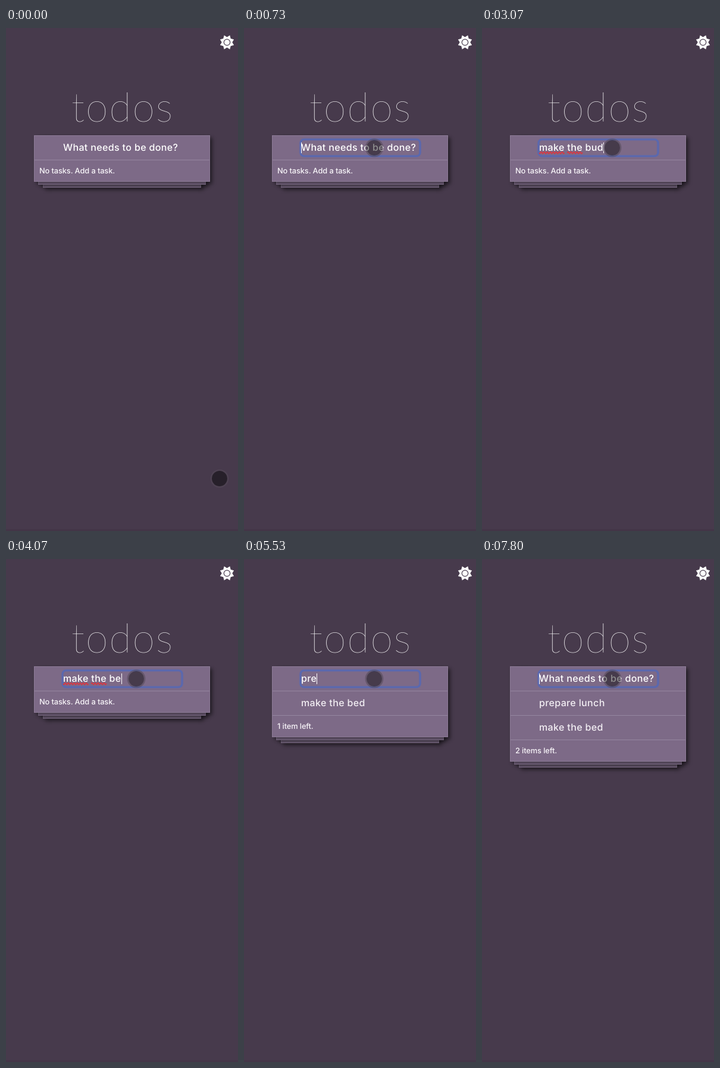
An HTML page with a canvas for the animation above (8 s loop, 390x844 px).

```html
<!DOCTYPE html>
<html lang="en">
<head>
<meta charset="utf-8">
<title>todos</title>
<style>
html, body { margin: 0; width: 100%; height: 100%; overflow: hidden; background: #473a4c; }
canvas { display: block; }
</style>
</head>
<body>
<canvas id="stage" width="390" height="844"></canvas>
<script>
const ctx = document.getElementById('stage').getContext('2d');
const LOOP = 8000;
const BODY_FONT = 'Inter, "Noto Sans", sans-serif';
const TITLE_FONT = 'Lato, Inter, sans-serif';
const PLACEHOLDER = 'What needs to be done?';
const BG = '#473a4c', CARD = '#7d6a87', LINE = '#9586a0';

// Each entry is [time, value]; a value holds until the next entry.
const typing = [
  [0, ''], [1870, 'm'], [1930, 'ma'], [2070, 'mak'], [2130, 'make'], [2270, 'make '],
  [2400, 'make t'], [2470, 'make th'], [2600, 'make the'], [2670, 'make the '],
  [2800, 'make the b'], [2930, 'make the bu'], [3070, 'make the bud'],
  [3530, 'make the bu'], [3930, 'make the b'], [4070, 'make the be'],
  [4270, 'make the bed'], [4330, ''],
  [5330, 'p'], [5470, 'pr'], [5530, 'pre'], [5600, 'prep'], [5730, 'prepa'],
  [5870, 'prepar'], [5930, 'prepare'], [6070, 'prepare '], [6270, 'prepare l'],
  [6470, 'prepare lu'], [6600, 'prepare lun'], [6670, 'prepare lunc'],
  [6800, 'prepare lunch'], [7530, '']
];
const caretShown = [
  [0, false], [600, true], [1130, false], [1670, true], [3600, false], [4070, true],
  [4730, false], [5270, true], [7270, false], [7800, true]
];
const tasks = [
  [0, []], [4330, ['make the bed']], [7530, ['prepare lunch', 'make the bed']]
];
const moveSteps = [[0, 0], [70, 1], [130, 2], [200, 3], [270, 4], [330, 5]];
const focusSteps = [[0, 0], [470, 1], [530, 2], [600, 3], [670, 4], [730, 5]];

const at = (track, t) => track.findLast(([start]) => start <= t)[1];
const mix = (a, b, p) => a + (b - a) * p;
const smooth = p => p * p * (3 - 2 * p);

function setFont(size, spacing, weight = 500, family = BODY_FONT) {
  ctx.font = `${weight} ${size}px ${family}`;
  ctx.letterSpacing = spacing + 'px';
  ctx.textRendering = 'geometricPrecision';
}

function text(str, x, y, color) {
  ctx.fillStyle = color;
  ctx.fillText(str, x, y);
}

function rect(x, y, w, h, color) {
  ctx.fillStyle = color;
  ctx.fillRect(x, y, w, h);
}

function circle(x, y, r) {
  ctx.beginPath();
  ctx.arc(x, y, r, 0, 2 * Math.PI);
}

function stroke(color, width) {
  ctx.strokeStyle = color;
  ctx.lineWidth = width;
  ctx.stroke();
}

function drawSun(x, y) {
  const points = 8;
  ctx.beginPath();
  for (let i = 0; i < 2 * points; i++) {
    const a = (i + 0.5) * Math.PI / points;
    const r = i % 2 ? 12.6 : 8.8;
    // Half a point of turn puts two spikes on every side.
    const turn = a - 0.5 * Math.PI / points - Math.PI / 2;
    ctx.lineTo(x + r * Math.cos(turn), y + r * Math.sin(turn));
  }
  ctx.closePath();
  ctx.fillStyle = '#fff';
  ctx.fill();
  circle(x, y, 5.2);
  stroke(BG, 1.2);
}

function drawCard(bottom) {
  const sheets = [[62, 266, bottom + 10], [54, 282, bottom + 5], [47, 296, bottom]];
  for (const [x, w, end] of sheets) {
    ctx.save();
    ctx.shadowColor = 'rgba(0,0,0,.45)';
    ctx.shadowBlur = 6;
    ctx.shadowOffsetX = ctx.shadowOffsetY = 4;
    rect(x, 180, w, end - 180, '#8c7b96');
    ctx.restore();
    rect(x + 1, 181, w - 2, end - 182, CARD);
  }
}

function drawFocusRing(alpha) {
  ctx.save();
  ctx.globalAlpha = alpha;
  ctx.beginPath();
  ctx.roundRect(95, 187, 201, 28, 6);
  stroke('rgba(88,104,178,.4)', 4.5);
  stroke('#5968b0', 2.6);
  ctx.restore();
}

function drawSquiggle(from, to) {
  ctx.beginPath();
  for (let x = from; x <= to; x += 0.5) {
    ctx.lineTo(x, 209.3 + 1.4 * Math.sin((x - 96) * 2 * Math.PI / 5));
  }
  stroke('#e3303a', 1.5);
}

function drawInput(t) {
  const typed = at(typing, t);
  const width = str => ctx.measureText(str).width;
  text(typed || PLACEHOLDER, 96, 206, '#fff');
  for (const [word, start] of [['make', ''], ['the', 'make ']]) {
    if (typed.startsWith(start + word + ' ')) {
      drawSquiggle(96 + width(start), 96 + width(start + word));
    }
  }
  if (at(caretShown, t)) rect(Math.round(96 + width(typed)), 192, 1, 18, '#fff');
}

function drawPointer(t) {
  const move = smooth(at(moveSteps, t) / 5);
  const settled = Math.min(1, at(focusSteps, t) / 2);
  const x = mix(359, 221, move) - 2 * settled;
  const y = mix(756, 207, move) - 6 * settled;
  circle(x, y, 13);
  ctx.fillStyle = 'rgba(0,0,0,.44)';
  ctx.fill();
  circle(x, y, 14.2);
  stroke('rgba(84,73,87,.55)', 2.5);
}

function draw(t) {
  const items = at(tasks, t);
  const n = items.length;
  const shift = 41 * n;
  rect(0, 0, 390, 844, BG);
  rect(0, 841, 390, 3, '#433547');
  drawSun(371.5, 24);

  ctx.textAlign = 'center';
  setFont(68, 2, 200, TITLE_FONT);
  text('todos', 196, 157, 'rgba(255,255,255,.95)');
  ctx.textAlign = 'left';

  drawCard(258 + shift);
  for (let i = 0; i <= n; i++) rect(48, 221 + 41 * i, 294, 1, LINE);

  drawFocusRing(at(focusSteps, t) / 5);
  setFont(16, 0.36);
  drawInput(t);
  items.forEach((item, i) => text(item, 96, 247 + 41 * i, '#f3eff4'));

  setFont(12.8, -0.1);
  text(n ? `${n} item${n > 1 ? 's' : ''} left.` : 'No tasks. Add a task.', 56, 244 + shift, '#f8f5f9');
  drawPointer(t);
}

const begin = performance.now();
function frame() {
  draw((performance.now() - begin) % LOOP);
  requestAnimationFrame(frame);
}
frame();
</script>
</body>
</html>
```
